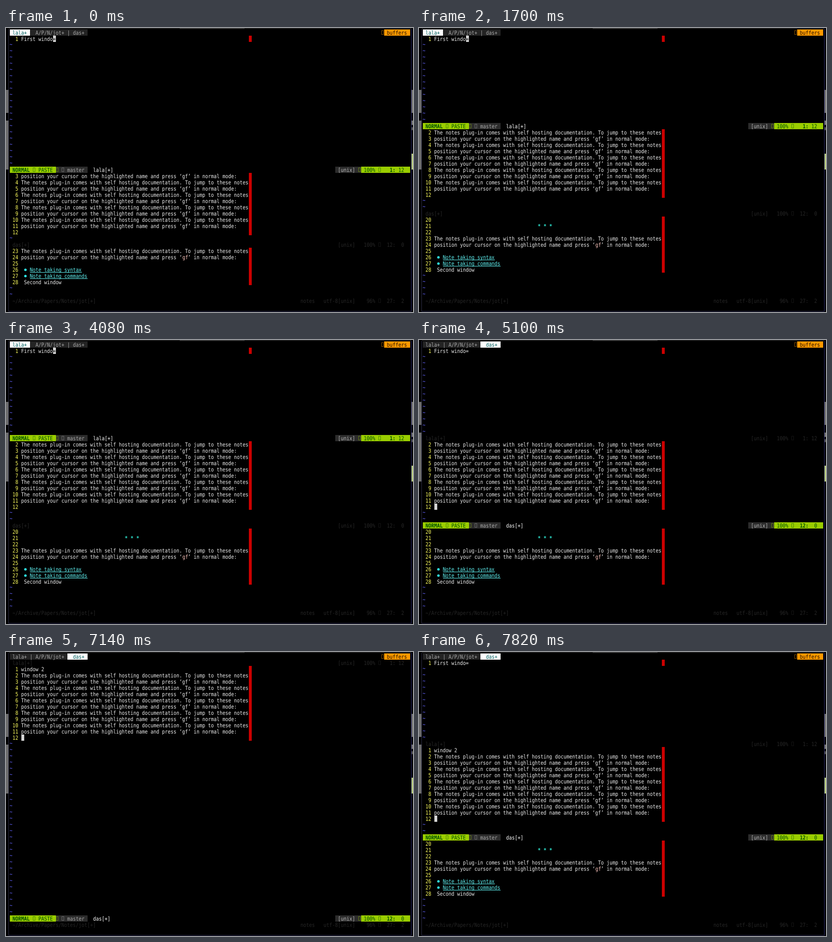
An HTML page that plays this animation: 848x592 px, repeating every 8 s.

```html
<!DOCTYPE html>
<html lang="en">
<head>
<meta charset="utf-8">
<title>Split windows</title>
<style>
  html, body { margin: 0; width: 100%; height: 100%; overflow: hidden; background: #000; }
  svg { display: block; width: 848px; height: 592px; }
  text {
    font-family: "DejaVu Sans Mono", monospace;
    font-size: 9.966px; /* gives a 6px advance */
    white-space: pre;
    text-rendering: geometricPrecision;
  }
</style>
</head>
<body>
<svg id="stage" viewBox="0 0 848 592"></svg>
<script>
const NS = "http://www.w3.org/2000/svg";
const CELL_W = 6, CELL_H = 13, LEFT = 8, TOP = 3, LOOP = 8000;
const TEXT_COL = 4, MARGIN_COL = 83, LAST_COL = 139;
const INK = "#ececec", YELLOW = "#ffff5f", CYAN = "#5ff0f0", RED = "#cc0000",
      TILDE = "#5050d0", GREEN = "#9acd00", DARK_GREEN = "#005000", GRAY = "#2c2c2c",
      SOFT = "#a8a8a8", DIM = "#262626", WHITE = "#ffffff", TEAL = "#005f5f", ORANGE = "#ff9900";

const stage = document.getElementById("stage");
let layer = stage;

function add(name, attrs) {
  const node = document.createElementNS(NS, name);
  for (const key in attrs) node.setAttribute(key, attrs[key]);
  layer.appendChild(node);
  return node;
}
const rect = (x, y, width, height, fill) => add("rect", { x, y, width, height, fill });
const colX = col => LEFT + col * CELL_W;
const rowY = row => TOP + row * CELL_H;

function fillCells(col, row, cols, color, rows = 1) {
  rect(colX(col), rowY(row), cols * CELL_W, rows * CELL_H, color);
}
// Glyphs sit half a pixel left of the cell's centre.
function write(col, row, string, color = INK, weight = 400, shift = 0) {
  add("text", {
    transform: `translate(${colX(col) - 0.5} ${rowY(row) + 11 + shift}) scale(1 1.17)`,
    fill: color, "font-weight": weight
  }).textContent = string;
}
function box(col, row, color) {
  add("rect", {
    x: colX(col) + 0.5, y: rowY(row) + 2.5, width: 4, height: 8,
    fill: "none", stroke: color, "stroke-dasharray": "1 1"
  });
}

// Buffers: one function per buffer draws the line with the given number.
const PAIR = [
  "The notes plug-in comes with self hosting documentation. To jump to these notes",
  "position your cursor on the highlighted name and press ‘gf’ in normal mode:"
];

function link(row, label) {
  add("circle", { cx: colX(TEXT_COL + 1) + 2.5, cy: rowY(row) + 7, r: 2.6, fill: "#2ee6e6" });
  write(TEXT_COL + 3, row, label, CYAN);
  rect(colX(TEXT_COL + 3), rowY(row) + 12, label.length * CELL_W, 1, CYAN);
}
function drawFirst(line, row) {
  write(TEXT_COL, row, "First windo=");
}
function drawSecond(line, row) {
  if (line === 1) write(TEXT_COL, row, "window 2");
  else if (line < 12) write(TEXT_COL, row, PAIR[line % 2]);
}
function drawNotes(line, row) {
  if (line === 21) write(TEXT_COL + 36, row, "* * *", "#2ee6d0", 700);
  if (line === 23) write(TEXT_COL, row, PAIR[0]);
  if (line === 24) {
    const at = PAIR[1].indexOf("gf");
    write(TEXT_COL, row, PAIR[1].replace("gf", "  "));
    write(TEXT_COL + at, row, "gf", "#ffc8c0");
  }
  if (line === 26) link(row, "Note taking syntax");
  if (line === 27) link(row, "Note taking commands");
  if (line === 28) write(TEXT_COL + 1, row, "Second window");
}

const PANES = [
  { name: "lala[+]", last: 1, draw: drawFirst, cursor: [11, 1, "="], percent: "100%", at: ["1:", "12"] },
  { name: "das[+]", last: 12, draw: drawSecond, cursor: [0, 12, ""], percent: "100%", at: ["12:", "0"] },
  { name: "~/Archive/Papers/Notes/jot[+]", last: 28, draw: drawNotes, percent: "96%", at: ["27:", "2"], kind: "notes   utf-8" }
];

function drawStatus(pane, row, active) {
  const ink = active ? DARK_GREEN : DIM;
  if (active) {
    fillCells(0, row, 16, GREEN);
    fillCells(16, row, 11, GRAY);
    fillCells(113, row, 9, GRAY);
    fillCells(122, row, LAST_COL - 122, GREEN);
    write(1, row, "NORMAL", ink, 700);
    box(8, row, ink);
    write(10, row, "PASTE", ink);
    box(16, row, GREEN);
    box(18, row, SOFT);
    write(20, row, "master", SOFT);
    box(121, row, GREEN);
  }
  write(active ? 29 : 1, row, pane.name, active ? WHITE : DIM);
  if (pane.kind) write(101, row, pane.kind, DIM);
  write(114, row, "[unix]", active ? "#b8b8b8" : DIM);
  write(127 - pane.percent.length, row, pane.percent, ink);
  box(128, row, ink);
  write(134 - pane.at[0].length, row, pane.at[0], ink, active ? 700 : 400);
  write(137 - pane.at[1].length, row, pane.at[1], ink);
}

function drawPane(pane, top, height, first, active) {
  const shown = Math.min(height, pane.last - first + 1);
  if (shown > 0) fillCells(MARGIN_COL, top, 1, RED, shown);
  for (let i = 0; i < height; i++) {
    const row = top + i, line = first + i;
    if (line > pane.last) {
      write(0, row, "~", TILDE, 700, -2.5);
      continue;
    }
    write(3 - String(line).length, row, String(line), YELLOW);
    pane.draw(line, row);
    if (active && pane.cursor && pane.cursor[1] === line) {
      fillCells(TEXT_COL + pane.cursor[0], row, 1, "#d4d4d4");
      write(TEXT_COL + pane.cursor[0], row, pane.cursor[2], "#000");
    }
  }
  drawStatus(pane, top + height, active);
}

function drawTabs(active) {
  const tabs = [[1, "lala+"], [9, "A/P/N/jot+"], [22, "das+"]];
  fillCells(0, 0, 27, "#242424");
  fillCells(active ? 20 : 0, 0, 7, WHITE);
  tabs.forEach(([col, label], i) =>
    write(col, 0, label, i === active * 2 ? TEAL : SOFT));
  write(active ? 7 : 20, 0, "|", SOFT);
  box(129, 0, ORANGE);
  fillCells(130, 0, 9, ORANGE);
  write(131, 0, "buffers", "#1c1000");
}

function drawDesktop() {
  rect(0, 0, 848, 592, "#000");
  rect(6, 0, 838, 2, "#1c1c1c");
  rect(362, 0, 135, 2, "#3a3a3a");
  rect(0, 129, 5, 48, "#6c6c6c");
  rect(0, 193, 5, 102, "#6c6c6c");
  rect(845, 129, 3, 48, "#747474");
  rect(845, 193, 3, 9, "#747474");
  rect(845, 207, 3, 6, "#505050");
  rect(845, 262, 3, 33, "#b8cc80");
  rect(5, 2, 1, 589, "#2c2c44");
  rect(844, 2, 1, 589, "#28286c");
  rect(5, 590, 840, 1, "#2a2a50");
}

// start ms, active pane, [height, first line] of each pane
const SCENES = [
  [0,    0, [[21, 1], [11, 3], [8, 23]]],
  [1700, 0, [[14, 1], [13, 2], [13, 20]]],
  [4760, 1, [[14, 1], [13, 2], [13, 20]]],
  [5440, 1, [[0, 1], [40, 1], [0, 28]]],
  [7480, 1, [[13, 1], [14, 1], [13, 20]]]
];

drawDesktop();
SCENES.forEach(([, active, sizes], i) => {
  layer = stage;
  const scene = layer = add("g", {});
  drawTabs(active);
  let top = 1;
  sizes.forEach(([height, first], n) => {
    drawPane(PANES[n], top, height, first, n === active);
    top += height + 1;
  });
  const steps = SCENES.map(([time], n) => (
    { opacity: n === i ? 1 : 0, offset: time / LOOP, easing: "step-end" }));
  scene.animate([...steps, { opacity: 0, offset: 1 }], { duration: LOOP, iterations: Infinity });
});
</script>
</body>
</html>
```
